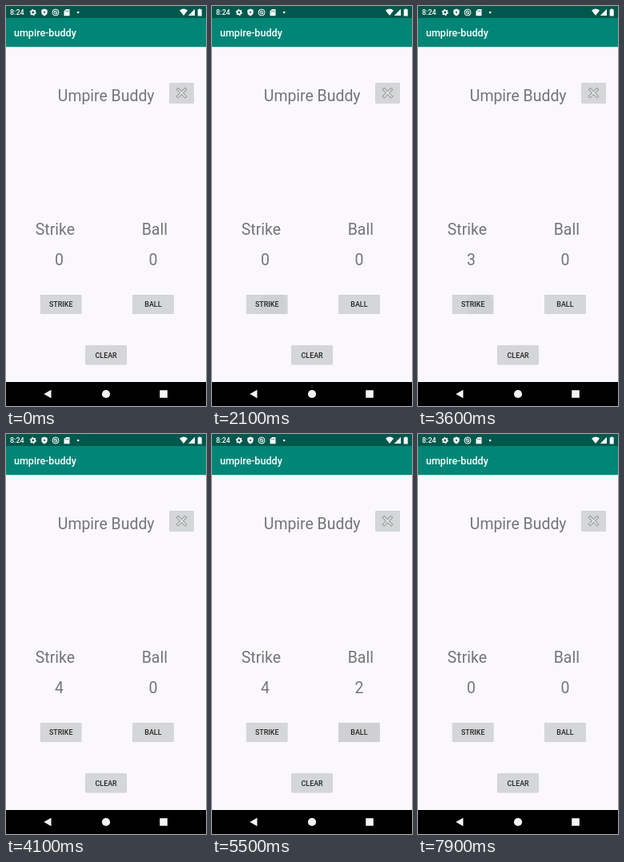
Write an HTML page that moves like this. It is 250 px wide and 500 px high and loops after 8 s.

```html
<!DOCTYPE html>
<html lang="en">
<head>
<meta charset="utf-8">
<title>Umpire Buddy</title>
<style>
  html, body { margin: 0; width: 100%; height: 100%; overflow: hidden; background: #faf8fc; }
  svg { display: block; width: 250px; height: 500px; font-family: Roboto, sans-serif; }
  .label { font-size: 19.45px; fill: #757477; text-anchor: middle; }
  .caption { font-size: 8.9px; font-weight: 500; fill: #222; text-anchor: middle; }
  .face { fill: #d5d6d8; }
</style>
</head>
<body>
<svg viewBox="0 0 250 500">
  <rect width="250" height="500" fill="#faf8fc"/>
  <rect y="15" width="250" height="36" fill="#008577" style="filter:drop-shadow(0 .7px .8px #0004)"/>
  <rect width="250" height="15" fill="#00574b"/>

  <!-- Status bar -->
  <text x="5" y="11.2" font-size="9" font-weight="500" fill="#fff">8:24</text>
  <g fill="none" stroke="#fff">
    <circle cx="33.8" cy="8" r="2.3" stroke-width="1.8"/>
    <circle cx="33.8" cy="8" r="3.6" stroke-width="1.1" stroke-dasharray="1.6 2.17"/>
    <path d="M48 3.5l3.7 1.5v2.8q0 3-3.7 4.8q-3.7-1.8-3.7-4.8V5z" fill="#fff" stroke="none"/>
    <circle cx="48" cy="7.8" r="1.1" fill="#00574b" stroke="none"/>
    <circle cx="62" cy="8" r="4" stroke-width="1"/>
    <circle cx="62" cy="8" r="1.9" stroke-width=".9"/>
    <path d="M59.4 5.4l5.2 5.2" stroke-width=".8"/>
  </g>
  <g fill="#fff">
    <path d="M75 4h4.5v8.2h-7V6.5z"/>
    <path d="M74.6 6v1.5m1.6-2v2m1.6-2v2" stroke="#00574b" stroke-width=".7"/>
    <circle cx="90.2" cy="8" r="1.3"/>
    <path d="M217 5.4q5-3.6 10 0l-5 6.6z"/>
    <path d="M236 3.8V12h-8.2z"/>
    <path d="M241.2 3.4h2v.8h1.5V12.4h-5V4.2h1.5z"/>
  </g>

  <text x="9.9" y="38.2" font-size="12.6" font-weight="500" fill="#fff">umpire-buddy</text>

  <text class="label" x="125.2" y="119">Umpire Buddy</text>
  <text class="label" x="61.4" y="286.2">Strike</text>
  <text class="label" x="185.8" y="286.2">Ball</text>
  <text class="label" id="strikes" x="66.4" y="324">0</text>
  <text class="label" id="balls" x="184" y="324">0</text>

  <!-- Close button -->
  <rect class="face" x="204.4" y="96.3" width="30.6" height="25.2" rx="1" style="filter:drop-shadow(0 .7px .6px #0004)"/>
  <g stroke-linecap="square">
    <path d="M215.2 104.4l8.6 8.6m0-8.6l-8.6 8.6" stroke="#8b8c8d" stroke-width="3.7"/>
    <path d="M215.2 104.4l8.6 8.6m0-8.6l-8.6 8.6" stroke="#e0e1e2" stroke-width="2"/>
  </g>

  <g id="buttons"></g>

  <!-- Navigation bar -->
  <rect y="470" width="250" height="30"/>
  <g fill="#f4f4f4">
    <path d="M47.3 485l9.2-5.2v10.4z"/>
    <circle cx="125" cy="485" r="5.1"/>
    <rect x="192.2" y="480.2" width="9.6" height="9.6" rx=".6"/>
  </g>
</svg>
<script>
const LOOP = 8000, STEP = 100, COUNT_DELAY = 80;
const NS = 'http://www.w3.org/2000/svg';
const SIZE = { width: 51.4, height: 23.6, rx: 1 };

// Touch feedback: age, ripple radius, ripple strength, shade, lift
const FEEDBACK = [
  [0, 14, 0, 0, 0],
  [50, 17, .35, 0, 0],
  [100, 18, .9, .75, .7],
  [200, 40, 1, 1, 1],
  [300, 44, .7, .6, .6],
  [450, 44, 0, 0, 0]
];

const strikePresses = [2050, 2750, 3150, 3550];
const ballPresses = [4600, 5100, 5600];
const clearPress = 6300;

function add(parent, tag, attrs) {
  const el = document.createElementNS(NS, tag);
  for (const key in attrs) el.setAttribute(key, attrs[key]);
  return parent.appendChild(el);
}

function makeButton(name, x, y, touchX, presses) {
  const group = add(document.getElementById('buttons'), 'g', {});
  const box = { x, y, ...SIZE };
  const clip = add(group, 'clipPath', { id: 'clip-' + name });
  add(clip, 'rect', box);
  const face = add(group, 'rect', { ...box, class: 'face' });
  const shade = add(group, 'rect', box);
  const ripple = add(group, 'circle', { cx: touchX, cy: y + 12, 'clip-path': `url(#clip-${name})` });
  const caption = add(group, 'text', { class: 'caption', x: x + 25.8, y: y + 15 });
  caption.textContent = name;
  return { face, shade, ripple, presses };
}

const buttons = [
  makeButton('STRIKE', 42.9, 361.2, 76.5, strikePresses),
  makeButton('BALL', 158.1, 361.2, 187, ballPresses),
  makeButton('CLEAR', 99.3, 424.6, 126, [clearPress])
];

function feedbackAt(age) {
  const next = FEEDBACK.findIndex(row => row[0] > age);
  if (age < 0 || next < 1) return FEEDBACK[0];
  const a = FEEDBACK[next - 1], b = FEEDBACK[next];
  const k = (age - a[0]) / (b[0] - a[0]);
  return a.map((v, i) => v + (b[i] - v) * k);
}

function drawButton({ face, shade, ripple, presses }, t) {
  const last = presses.filter(p => p <= t).pop() ?? Infinity;
  const [, radius, strength, dark, lift] = feedbackAt(t - last);
  ripple.setAttribute('r', radius);
  ripple.setAttribute('fill-opacity', strength * .075);
  shade.setAttribute('fill-opacity', dark * .06);
  face.style.filter =
    `drop-shadow(0 ${.7 + lift * .9}px ${.6 + lift * .9}px rgba(0,0,0,${.27 + lift * .12}))`;
}

function countAt(presses, t) {
  if (t >= clearPress + COUNT_DELAY) return 0;
  return presses.filter(p => p + COUNT_DELAY <= t).length;
}

const strikes = document.getElementById('strikes');
const balls = document.getElementById('balls');
const start = performance.now();

function draw(now) {
  const t = Math.floor(Math.max(0, now - start) % LOOP / STEP) * STEP;
  strikes.textContent = countAt(strikePresses, t);
  balls.textContent = countAt(ballPresses, t);
  buttons.forEach(button => drawButton(button, t));
  requestAnimationFrame(draw);
}
draw(start);
</script>
</body>
</html>
```
